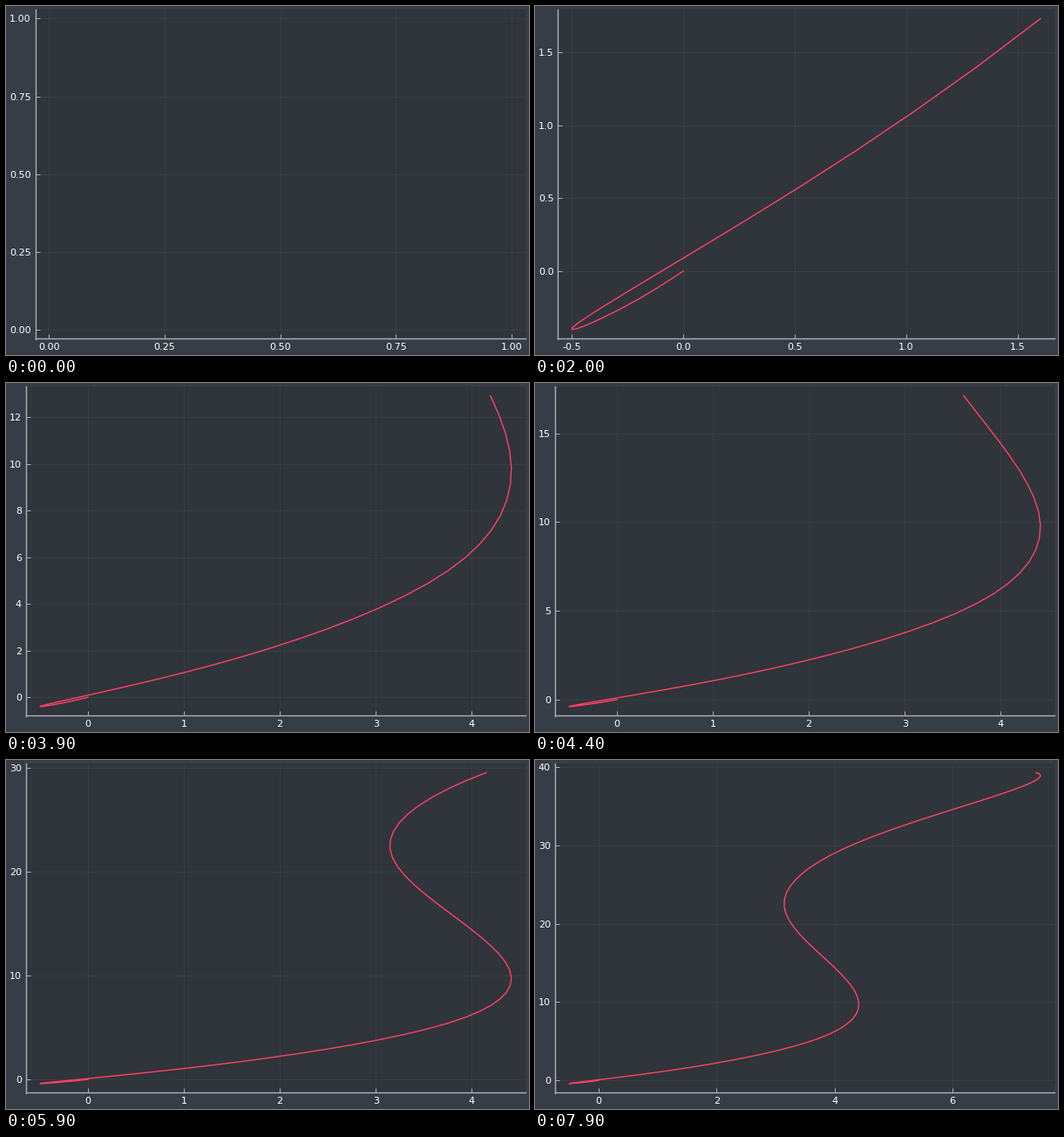
These frames come from a looping animation (600x400 px, 8000 ms). A matplotlib script:

```python
import numpy as np
import matplotlib.pyplot as plt
from matplotlib.animation import FuncAnimation

W, H, DPI = 600, 400, 100
STEPS, INTERVAL = 80, 100
OUTER, INNER = "#363D46", "#30343B"
AXIS, TEXT, CURVE = "#ADB2B7", "#FFFFFF", "#FE4365"
RIGHT, TOP, BOTTOM = 596, 3.8, 381.6
FONT_PT = 8
EM = FONT_PT * DPI / 72

# Key poses of the moving point: seconds, x, y
KEYS = [(0, 0, 0), (.5, -.43, -.367), (.9, -.47, -.353), (1.4, .103, .184),
        (2, 1.602, 1.73), (2.8, 3.745, 5.4), (3.6, 4.395, 10.56),
        (4.3, 3.735, 16.27), (5, 3.148, 22.19), (5.9, 4.15, 29.55),
        (6.8, 6.477, 35.7), (7.4, 7.4, 38.25), (7.9, 7.418, 39.28)]
V_START, V_END = (-1.02, -1.07), (-.62, 1)


def px(n):
    """Pixels to points."""
    return n * 72 / DPI


def smooth_path(keys, v0, v1, at):
    """Cubic spline through the keys with given end velocities."""
    keys = np.array(keys, float)
    t, p = keys[:, 0], keys[:, 1:]
    h = np.diff(t)
    d = np.diff(p, axis=0) / h[:, None]
    n = len(t)
    A, b = np.eye(n), np.zeros_like(p)
    b[0], b[-1] = v0, v1
    for i in range(1, n - 1):
        A[i, i - 1:i + 2] = h[i], 2 * (h[i - 1] + h[i]), h[i - 1]
        b[i] = 3 * (h[i] * d[i - 1] + h[i - 1] * d[i])
    v = np.linalg.solve(A, b)
    i = np.clip(np.searchsorted(t, at, side="right") - 1, 0, n - 2)
    w = h[i][:, None]
    s = (at - t[i])[:, None] / w
    return ((1 + 2 * s) * (1 - s) ** 2 * p[i] + s * (1 - s) ** 2 * w * v[i]
            + s ** 2 * (3 - 2 * s) * p[i + 1] + s ** 2 * (s - 1) * w * v[i + 1])


def limits(v):
    lo, hi = v.min(), v.max()
    if hi <= lo:
        hi = lo + 1
    pad = .03 * (hi - lo)
    return lo - pad, hi + pad


def nice_ticks(lo, hi):
    """Best scored set of 4 to 8 round ticks inside the limits, with labels."""
    span, best, pick = hi - lo, -1, None
    top = int(np.ceil(np.log10(span)))
    for z in range(top, top - 3, -1):
        for q, nice in ((2.5, .5), (1, 1), (5, .9), (2, .7), (3, .2)):
            step = q * 10.0 ** z
            a, b = int(np.ceil(lo / step)), int(np.floor(hi / step))
            n = b - a + 1
            if not 4 <= n <= 8:
                continue
            score = ((1 - abs(n - 5) / 5) / 4 + (a <= 0 <= b) / 6
                     + .5 * span / ((n - 1) * step) + nice / 4)
            if score > best + 1e-9:
                best = score
                pick = np.arange(a, b + 1) * step, max(0, (q == 2.5) - z)
    vals, dec = pick
    return vals, [f"{v:.{dec}f}" for v in vals]


def label_width(s):
    return EM * sum({".": .318, "-": .361}.get(c, .636) for c in s)


path = smooth_path(KEYS, V_START, V_END, np.arange(STEPS) * INTERVAL / 1000)

plt.rcParams["font.family"] = "DejaVu Sans"
fig = plt.figure(figsize=(W / DPI, H / DPI), dpi=DPI, facecolor=OUTER)
ax = fig.add_axes([.05, .05, .9, .9], facecolor=INNER)
ax.set_axisbelow(True)
for side in ("top", "right"):
    ax.spines[side].set_visible(False)
for side in ("left", "bottom"):
    ax.spines[side].set(color=AXIS, linewidth=1)
ax.spines["bottom"].set_position(("outward", -px(1)))
ax.grid(True, color=AXIS, alpha=.1, lw=.5)
ax.tick_params(direction="in", length=px(5), width=px(1), color=AXIS,
               labelcolor=TEXT, labelsize=FONT_PT)
ax.tick_params(axis="x", pad=px(5.4))
ax.tick_params(axis="y", pad=px(5))
line, = ax.plot([], [], color=CURVE, lw=1, solid_joinstyle="round")


def draw(i):
    x, y = path[:i + 1].T
    line.set_data(x, y)
    xlim, ylim = limits(x), limits(y)
    yt, ylab = nice_ticks(*ylim)
    left = 8.8 + max(map(label_width, ylab))
    ax.set_position([left / W, 1 - BOTTOM / H,
                     (RIGHT - left) / W, (BOTTOM - TOP) / H])
    ax.set_xticks(*nice_ticks(*xlim))
    ax.set_yticks(yt, ylab)
    ax.set_xlim(xlim)
    ax.set_ylim(ylim)
    return line,


anim = FuncAnimation(fig, draw, frames=STEPS, interval=INTERVAL,
                     init_func=lambda: draw(0), repeat=True, repeat_delay=0)
plt.show()
```
